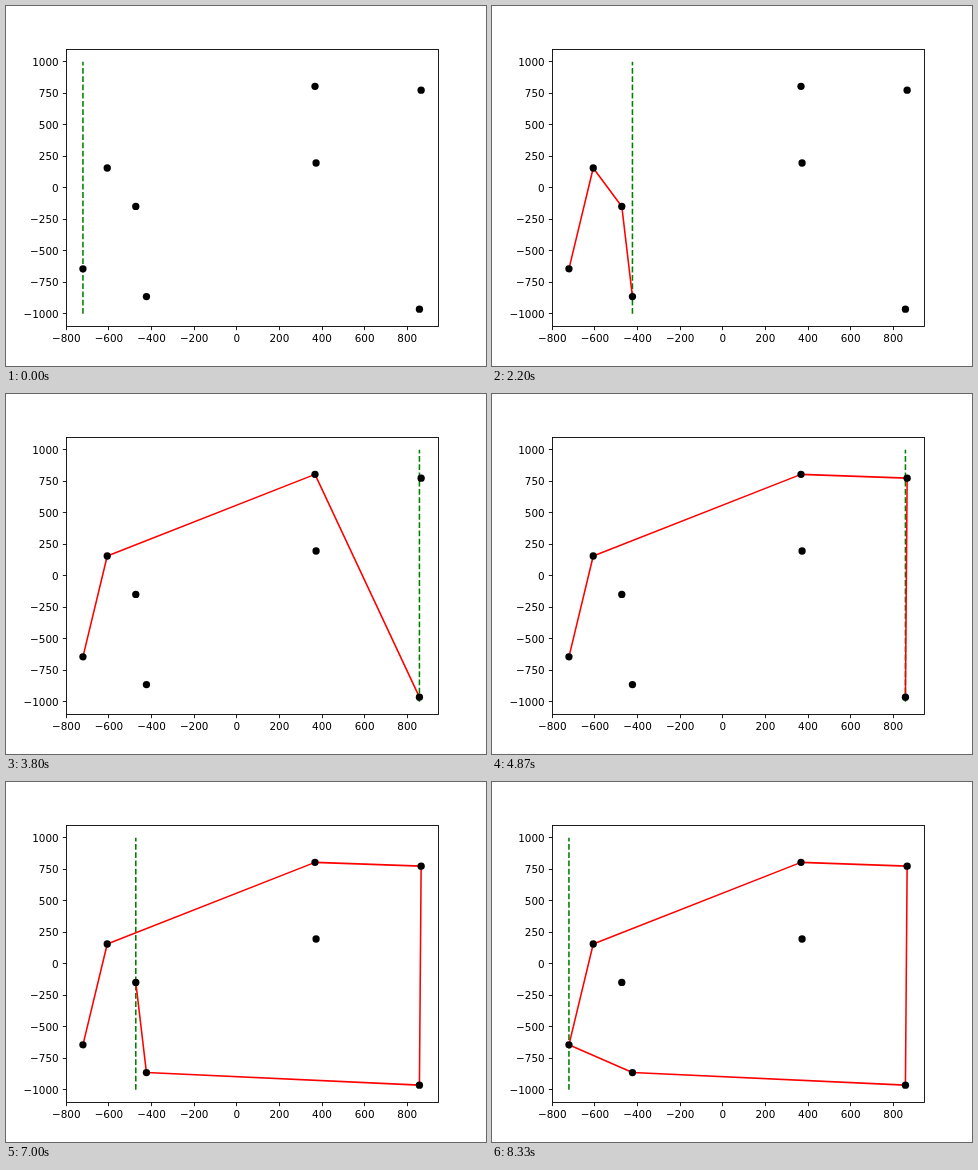
Write an HTML page that moves like this. It is 480x360 px and loops after 9070 ms.

```html
<!DOCTYPE html>
<html lang="en">
<head>
<meta charset="utf-8">
<title>Convex hull sweep</title>
<style>
  html, body { margin: 0; width: 100%; height: 100%; overflow: hidden; background: #fff; }
  svg { display: block; width: 480px; height: 360px; }
  text { font: 10.42px "DejaVu Sans", sans-serif; fill: #000; }
  .axis { fill: none; stroke: #000; stroke-width: .88; }
  #sweep { stroke: #008000; stroke-width: 1.56; stroke-dasharray: 5.78 2.5; }
  #hull { fill: none; stroke: #f00; stroke-width: 1.56; stroke-linejoin: round; stroke-linecap: square; }
</style>
</head>
<body>
<svg id="plot" viewBox="0 0 480 360">
  <line id="sweep"/>
  <polyline id="hull"/>
  <g id="dots"></g>
  <g id="axes"><rect class="axis" x="60.5" y="43.5" width="372" height="277"/></g>
</svg>
<script>
const LOOP = 9070, STEP = 1600 / 3;

// Sample points in data units, sorted by x
const points = [
  [-722, -643], [-608, 157], [-474, -148], [-424, -863],
  [367, 805], [372, 197], [857, -963], [865, 775]
];

const px = x => 230.8 + x * 0.2131;
const py = y => 181.8 - y * 0.126;
const byId = id => document.getElementById(id);

function add(parent, tag, attrs, label) {
  const el = document.createElementNS("http://www.w3.org/2000/svg", tag);
  set(el, attrs);
  if (label !== undefined) el.textContent = label;
  parent.append(el);
}

function set(el, attrs) {
  for (const key in attrs) el.setAttribute(key, attrs[key]);
}

function drawAxes() {
  const axes = byId("axes");
  const name = n => String(n).replace("-", "\u2212");
  const snap = v => Math.floor(v) + 0.5;
  for (let n = -800; n <= 800; n += 200) {
    add(axes, "path", { class: "axis", d: `M${snap(px(n))} 320.5v3.65` });
    add(axes, "text", { x: px(n), y: 335.6, "text-anchor": "middle" }, name(n));
  }
  for (let n = -1000; n <= 1000; n += 250) {
    add(axes, "path", { class: "axis", d: `M60.5 ${snap(py(n))}h-3.65` });
    add(axes, "text", { x: 52.7, y: py(n) + 3.9, "text-anchor": "end" }, name(n));
  }
}

// Monotone chain: left to right, then back again
function sweepStates() {
  const turn = (a, b, c) =>
    (b[0] - a[0]) * (c[1] - b[1]) - (b[1] - a[1]) * (c[0] - b[0]);
  const last = points.length - 1;
  const route = [...points, ...points.slice(0, last).reverse()];
  const chain = [];
  let base = 0;
  return route.map((p, i) => {
    while (chain.length >= base + 2 && turn(chain.at(-2), chain.at(-1), p) >= 0) chain.pop();
    chain.push(p);
    if (i === last) base = chain.length - 1;
    return {
      x: px(p[0]),
      path: chain.length > 1 ? chain.map(([x, y]) => `${px(x)},${py(y)}`).join(" ") : ""
    };
  });
}

drawAxes();
for (const [x, y] of points) add(byId("dots"), "circle", { cx: px(x), cy: py(y), r: 3.65 });

const states = sweepStates();
let shown = -1;

function frame() {
  const t = performance.now() % LOOP;
  // The first and last states hold for two beats
  const beat = Math.floor((t + 4) / STEP) - 1;
  const step = Math.max(0, Math.min(states.length - 1, beat));
  if (step !== shown) {
    const { x, path } = states[step];
    set(byId("sweep"), { x1: x, x2: x, y1: py(-1000), y2: py(1000) });
    set(byId("hull"), { points: path });
    shown = step;
  }
  requestAnimationFrame(frame);
}
frame();
</script>
</body>
</html>
```
